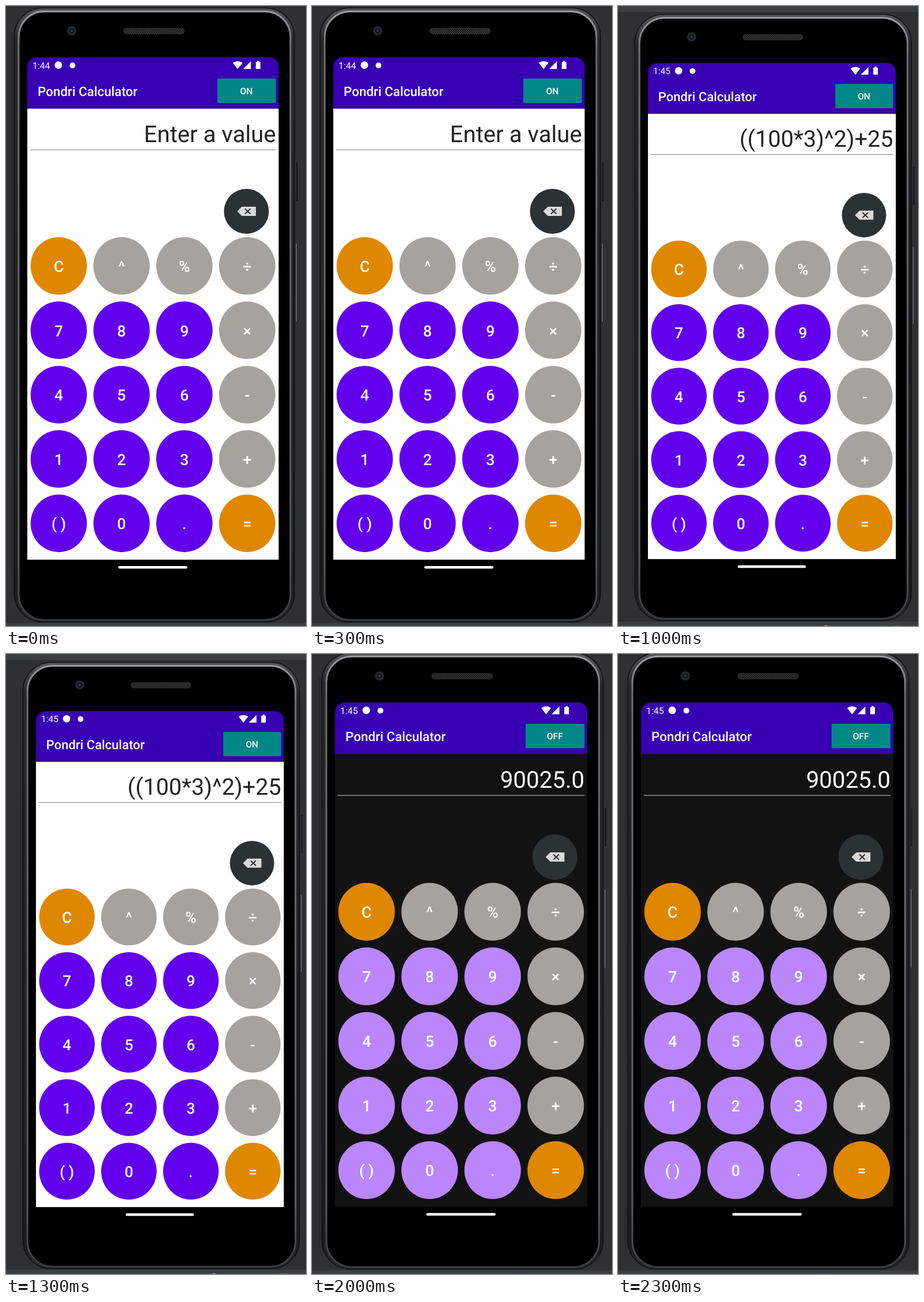
These frames come from a looping animation (521x1075 px, 2.5 s). An HTML page:

```html
<!DOCTYPE html>
<html lang="en">
<head>
<meta charset="utf-8">
<title>Calculator</title>
<style>
  html, body { margin: 0; width: 100%; height: 100%; overflow: hidden; background: #2f3032; }
  svg { display: block; width: 521px; height: 1075px; }
  text { font-family: Roboto, Arial, sans-serif; fill: #fff; text-rendering: geometricPrecision; }
  .mid { text-anchor: middle; font-weight: 500; }
  .screen { fill: #fff; }
  .num { fill: #6200ee; }
  .op { fill: #a6a29d; }
  .act { fill: #e08700; }
  #display { text-anchor: end; font-size: 40.2px; fill: #222; }
  #rule { stroke: #858585; }
  .dark .screen { fill: #121212; }
  .dark .num { fill: #bb86fc; }
  .dark #display { fill: #fff; }
  .dark #rule { stroke: #a8a8a8; }
</style>
</head>
<body>
<svg viewBox="0 0 521 1075">
  <defs>
    <pattern id="mesh" width="4" height="4" patternUnits="userSpaceOnUse">
      <path fill="#3a3a3a" d="M0 0h4v4H0z"/>
      <path stroke="#191919" d="M0 0l4 4M4 0L0 4"/>
    </pattern>
    <linearGradient id="shell" x2="0" y2="1">
      <stop offset="0" stop-color="#55575a"/>
      <stop offset=".05" stop-color="#27282a"/>
      <stop offset=".96" stop-color="#1b1c1e"/>
      <stop offset="1" stop-color="#2a2b2d"/>
    </linearGradient>
    <linearGradient id="rim" x2="0" y2="1">
      <stop offset="0" stop-color="#9a9c9f"/>
      <stop offset=".06" stop-color="#6c6d70"/>
      <stop offset=".9" stop-color="#58595c"/>
      <stop offset="1" stop-color="#3a3b3d"/>
    </linearGradient>
  </defs>
  <g id="scene">
    <!-- window behind the phone -->
    <path fill="#3c3f41" d="M-60-30h640v29h-640zM-60 1070h640v40h-640z"/>
    <g fill="none" stroke="#a5a7a9" stroke-width="1.5">
      <circle cx="350.5" cy="1084" r="7"/>
      <path d="M482 1078h-15v12M471 1083h11"/>
    </g>

    <!-- phone body -->
    <path stroke="#28292b" stroke-width="2" d="M10 45V1030"/>
    <g fill="#1b1c1e" stroke="#3c3d40">
      <rect x="503" y="270" width="4.5" height="69" rx="1.5"/>
      <rect x="503" y="411" width="4.5" height="137" rx="1.5"/>
    </g>
    <path stroke="#77787b" stroke-width="1.5" d="M504.500 412V547"/>
    <rect x="14" y="3.500" width="487" height="1064.500" rx="50" fill="url(#shell)" stroke="#0d0e0f" stroke-width="1.500"/>
    <rect x="22" y="9.500" width="472" height="1055" rx="44" stroke="url(#rim)" stroke-width="3"/>
    <circle cx="114" cy="43" r="8" fill="#29292c"/>
    <circle cx="114" cy="43" r="4.500" fill="#12151f"/>
    <circle cx="114" cy="43" r="2" fill="#2c3c66"/>
    <rect x="204" y="38" width="106" height="11" rx="5" fill="url(#mesh)"/>

    <!-- screen -->
    <path class="screen" d="M37 178h436.500v782H37z"/>
    <path fill="#3700b3" d="M37 178V105a16 16 0 0 1 16-16H457.500a16 16 0 0 1 16 16v73z"/>
    <text id="clock" x="46" y="108.500" font-size="15.800"/>
    <g fill="#fff">
      <circle cx="91" cy="102.500" r="6.500"/>
      <circle cx="115.500" cy="103" r="5"/>
      <path d="M402.300 109.300L393.800 98.500q8.500-5.500 17 0zM412 109.300L425.300 95.800v13.500z"/>
      <path d="M433.800 97h2.300V95.200h3.400v1.800h2.300v12.300h-8z"/>
      <rect x="195" y="971" width="120" height="4.500" rx="2.200"/>
    </g>
    <text x="55" y="156" font-size="22.400" font-weight="500">Pondri Calculator</text>
    <rect x="366.800" y="125.800" width="102" height="42.400" rx="2" fill="#018786"/>
    <text id="mode" class="mid" x="417.500" y="153" font-size="15.600"/>
    <text id="display" x="468.800" y="236"/>
    <path id="rule" stroke-width="1.200" d="M41.500 249.500H469"/>

    <!-- keys -->
    <circle cx="417.500" cy="356" r="39" fill="#2b3236"/>
    <path fill="#d8d9d9" d="M401.500 356l8-8H434v16h-24.500z"/>
    <path stroke="#2b3236" stroke-width="2" d="M415 351.500l9.500 9M424.500 351.500l-9.500 9"/>
    <g id="keys"></g>
  </g>
</svg>
<script>
const $ = id => document.getElementById(id);

const keys = ['C', '^', '%', '÷', '7', '8', '9', '×', '4', '5', '6', '-',
              '1', '2', '3', '+', '( )', '0', '.', '='];
const keyClass = k => 'C='.includes(k) ? 'act' : '^%÷×-+'.includes(k) ? 'op' : 'num';

$('keys').innerHTML = keys.map((k, i) => {
  const x = 91.6 + i % 4 * 109.1, y = 450.6 + Math.floor(i / 4) * 111.6;
  return `<ellipse class="${keyClass(k)}" cx="${x}" cy="${y}" rx="48.9" ry="49.9"/>
    <text class="mid" x="${x}" y="${y + 10.4}" font-size="26.7">${k}</text>`;
}).join('');

// Screen left, top, width and height, then clock, display and dark mode
const views = [
  [37, 89, 436.5, 871, '1:44', 'Enter a value', false],
  [47.5, 91.3, 433.3, 865.3, '1:44', 'Enter a value', true],
  [52, 99, 430.5, 860, '1:45', '((100*3)^2)+25', false],
  [49, 90.5, 434.8, 867, '1:45', '90025.0', false],
  [40, 84.1, 438, 874, '1:45', '90025.0', true]
];
const STEP = 500;
const start = performance.now();
let shown = -1;

function show(i) {
  const [x, y, w, h, clock, value, dark] = views[i];
  $('scene').setAttribute('transform',
    `translate(${x} ${y}) scale(${w / 436.5} ${h / 871}) translate(-37 -89)`);
  $('scene').setAttribute('class', dark ? 'dark' : '');
  $('clock').textContent = clock;
  $('display').textContent = value;
  $('mode').textContent = dark ? 'OFF' : 'ON';
}

function tick(now) {
  const i = Math.floor(Math.max(0, now - start) / STEP) % views.length;
  if (i !== shown) show(shown = i);
  requestAnimationFrame(tick);
}
tick(start);
</script>
</body>
</html>
```
